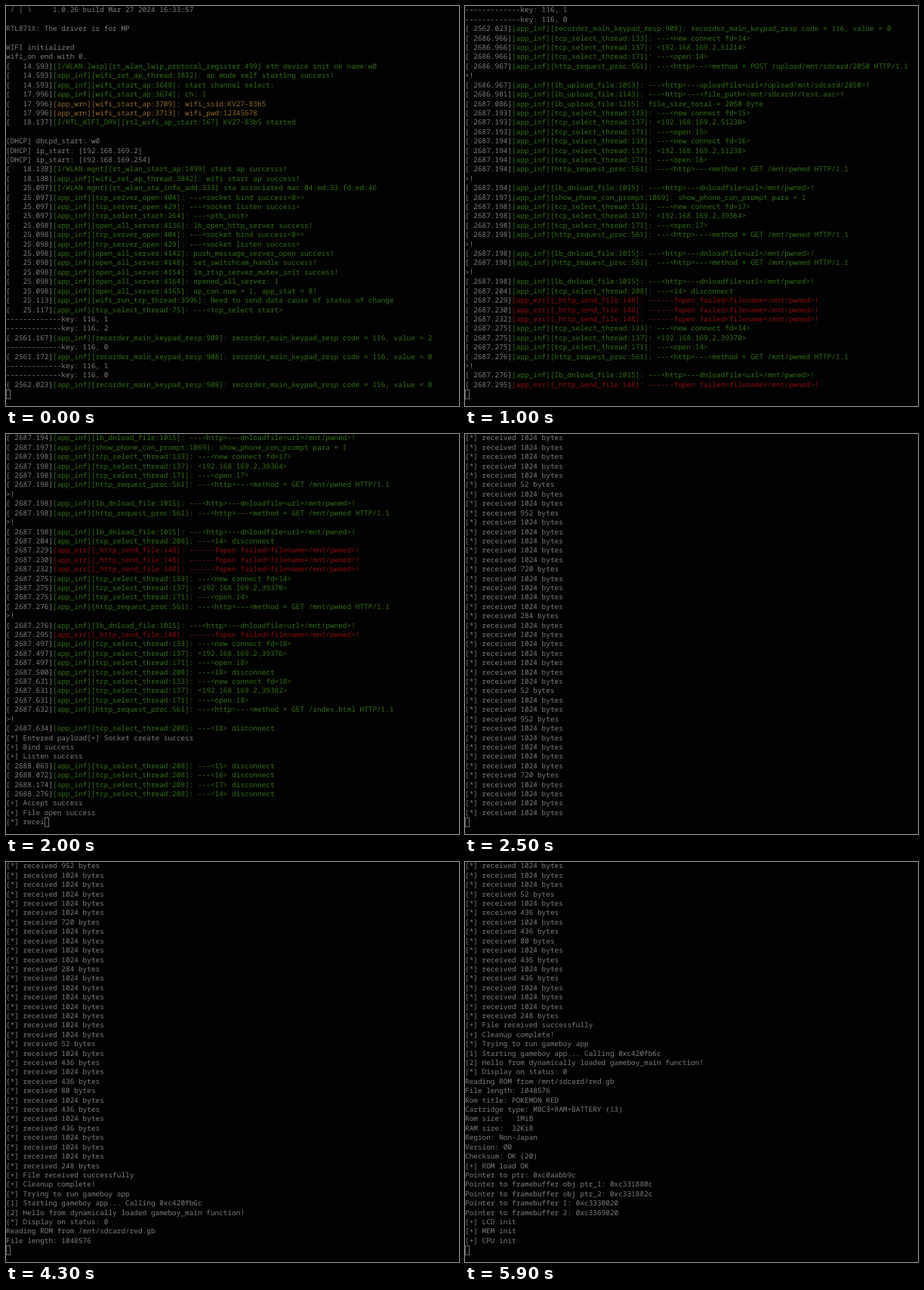
Animation, 600 px wide and 530 px high, one loop 6 s. Source, as an HTML page:

```html
<!DOCTYPE html>
<html lang="en">
<head>
<meta charset="utf-8">
<title>Serial console</title>
<style>
  html, body { margin: 0; width: 100%; height: 100%; overflow: hidden; background: #020202; }
  #term {
    position: relative; width: 600px; height: 530px; overflow: hidden;
    color: #7e7e78;
    font: 9.42px/12.4px "Noto Sans Mono", monospace;
    font-variant-ligatures: none;
    text-rendering: geometricPrecision;
  }
  .row { position: absolute; left: 0; height: 12.4px; white-space: pre; }
  .info { color: #327017; }
  .warn { color: #92692a; }
  .fail { color: #8e0d0d; }
  .cursor {
    display: inline-block; box-sizing: border-box; vertical-align: top;
    width: 6px; height: 12.4px; border: 1px solid #6c6c68;
  }
</style>
</head>
<body>
<div id="term"></div>
<script>
const LOOP = 6000, STEP = 100;
const ROWS = 42, PITCH = 12.41, TOP = -0.6;
const BAUD = 11.5;        // characters per ms
const CLOCK = 2686.36;    // device uptime in seconds when the loop starts

// "uptime tag function:line message", "@ms" sets the time of plain lines
const session = String.raw` / | \     1.0.26 build Mar 27 2024 16:33:57

RTL871X: The driver is for MP

WIFI initialized
wifi_on end with 0.
14.593 I/WLAN.lwip rt_wlan_lwip_protocol_register:499 eth device init ok name:w0
14.593 inf wifi_set_ap_thread:3832 ap mode self starting success!
14.593 inf wifi_start_ap:3648 start channel select:
17.996 inf wifi_start_ap:3674 ch: 1
17.996 wrn wifi_start_ap:3709 wifi_ssid:KV27-83b5
17.996 wrn wifi_start_ap:3713 wifi_pwd:12345678
18.137 I/RTL_WIFI_DRV rtl_wifi_ap_start:167 KV27-83b5 started

[DHCP] dhcpd_start: w0
[DHCP] ip_start: [192.168.169.2]
[DHCP] ip_start: [192.168.169.254]
18.138 I/WLAN.mgnt rt_wlan_start_ap:1499 start ap successs!
18.138 inf wifi_set_ap_thread:3842 wifi start ap success!
25.097 I/WLAN.mgnt rt_wlan_sta_info_add:333 sta associated mac:04:ed:33:fd:ed:46
25.097 inf tcp_server_open:404 ---<socket bind success<0>>
25.097 inf tcp_server_open:429 ---<socket listen success>
25.097 inf tcp_select_start:264 ---<pth_init>
25.098 inf open_all_server:4136 lb_open_http_server success!
25.098 inf tcp_server_open:404 ---<socket bind success<0>>
25.098 inf tcp_server_open:429 ---<socket listen success>
25.098 inf open_all_server:4142 push_message_server_open success!
25.098 inf open_all_server:4148 set_switchcam_handle success!
25.098 inf open_all_server:4154 lm_rtsp_server_mutex_init success!
25.098 inf open_all_server:4164 opened_all_server: 1
25.098 inf open_all_server:4165 ap_con.num = 1, app_stat = 8!
25.113 inf wifi_run_tcp_thread:3996 Need to send data cause of status of change
25.117 inf tcp_select_thread:75 ---<tcp_select start>
-------------key: 116, 1
-------------key: 116, 2
2561.167 inf recorder_main_keypad_resp:908 recorder_main_keypad_resp code = 116, value = 2
-------------key: 116, 0
2561.172 inf recorder_main_keypad_resp:908 recorder_main_keypad_resp code = 116, value = 0
-------------key: 116, 1
-------------key: 116, 0
2562.023 inf recorder_main_keypad_resp:908 recorder_main_keypad_resp code = 116, value = 0
2686.966 inf tcp_select_thread:133 ---<new connect fd=14>
2686.966 inf tcp_select_thread:137 <192.168.169.2,51214>
2686.966 inf tcp_select_thread:171 ---<open:14>
2686.967 inf http_request_proc:561 ---<http>---<method = POST /upload/mnt/sdcard/2050 HTTP/1.1
>!
2686.967 inf lb_upload_file:1053 ---<http>---uploadfile<url=/upload/mnt/sdcard/2050>!
2686.981 inf lb_upload_file:1143 ---<http>---<file_path=/mnt/sdcard//test.aac>!
2687.086 inf lb_upload_file:1215 file_size_total = 2050 Byte
2687.193 inf tcp_select_thread:133 ---<new connect fd=15>
2687.193 inf tcp_select_thread:137 <192.168.169.2,51230>
2687.193 inf tcp_select_thread:171 ---<open:15>
2687.194 inf tcp_select_thread:133 ---<new connect fd=16>
2687.194 inf tcp_select_thread:137 <192.168.169.2,51238>
2687.194 inf tcp_select_thread:171 ---<open:16>
2687.194 inf http_request_proc:561 ---<http>---<method = GET /mnt/pwned HTTP/1.1
>!
2687.194 inf lb_dnload_file:1015 ---<http>---dnloadfile<url=/mnt/pwned>!
2687.197 inf show_phone_con_prompt:1069 show_phone_con_prompt para = 1
2687.198 inf tcp_select_thread:133 ---<new connect fd=17>
2687.198 inf tcp_select_thread:137 <192.168.169.2,39364>
2687.198 inf tcp_select_thread:171 ---<open:17>
2687.198 inf http_request_proc:561 ---<http>---<method = GET /mnt/pwned HTTP/1.1
>!
2687.198 inf lb_dnload_file:1015 ---<http>---dnloadfile<url=/mnt/pwned>!
2687.198 inf http_request_proc:561 ---<http>---<method = GET /mnt/pwned HTTP/1.1
>!
2687.198 inf lb_dnload_file:1015 ---<http>---dnloadfile<url=/mnt/pwned>!
2687.204 inf tcp_select_thread:208 ---<14> disconnect
2687.229 err _http_send_file:148 ------fopen failed<filename=/mnt/pwned>!
2687.230 err _http_send_file:148 ------fopen failed<filename=/mnt/pwned>!
2687.232 err _http_send_file:148 ------fopen failed<filename=/mnt/pwned>!
2687.275 inf tcp_select_thread:133 ---<new connect fd=14>
2687.275 inf tcp_select_thread:137 <192.168.169.2,39370>
2687.275 inf tcp_select_thread:171 ---<open:14>
2687.276 inf http_request_proc:561 ---<http>---<method = GET /mnt/pwned HTTP/1.1
>!
2687.276 inf lb_dnload_file:1015 ---<http>---dnloadfile<url=/mnt/pwned>!
2687.295 err _http_send_file:148 ------fopen failed<filename=/mnt/pwned>!
2687.497 inf tcp_select_thread:133 ---<new connect fd=18>
2687.497 inf tcp_select_thread:137 <192.168.169.2,39376>
2687.497 inf tcp_select_thread:171 ---<open:18>
2687.500 inf tcp_select_thread:208 ---<18> disconnect
2687.631 inf tcp_select_thread:133 ---<new connect fd=18>
2687.631 inf tcp_select_thread:137 <192.168.169.2,39382>
2687.631 inf tcp_select_thread:171 ---<open:18>
2687.632 inf http_request_proc:561 ---<http>---<method = GET /index.html HTTP/1.1
>!
2687.634 inf tcp_select_thread:208 ---<18> disconnect
@1290
[*] Entered payload[+] Socket create success
[+] Bind success
[+] Listen success
2688.063 inf tcp_select_thread:208 ---<15> disconnect
2688.072 inf tcp_select_thread:208 ---<16> disconnect
2688.174 inf tcp_select_thread:208 ---<17> disconnect
2688.276 inf tcp_select_thread:208 ---<14> disconnect
@1930
[+] Accept success
[+] File open success`;

const launch = `@3570
[+] File received successfully
[+] Cleanup complete!
[*] Trying to run gameboy app
@3670
[1] Starting gameboy app... Calling 0xc420fb6c
[2] Hello from dynamically loaded gameboy_main function!
@3970
[*] Display on status: 0
@4270
Reading ROM from /mnt/sdcard/red.gb
File length: 1048576
@5270
Rom title: POKEMON RED
Cartridge type: MBC3+RAM+BATTERY (13)
Rom size:   1MiB
RAM size:  32KiB
Region: Non-Japan
Version: 00
Checksum: OK (20)
[+] ROM load OK
Pointer to ptr: 0xc0aabb9c
Pointer to framebuffer obj ptr_1: 0xc331880c
Pointer to framebuffer obj ptr_2: 0xc331882c
Pointer to framebuffer 1: 0xc3330020
Pointer to framebuffer 2: 0xc3369020
@5670
[+] LCD init
@5770
[+] MEM init
[+] CPU init`;

const tones = { wrn: 'warn', err: 'fail' };
const rows = [];

function addLog(text) {
  let t = -1000;
  for (const line of text.split('\n')) {
    const mark = line.match(/^@(\d+)$/);
    const entry = line.match(/^(\d+\.\d+) (\S+) (\S+) (.*)$/);
    if (mark) {
      t = +mark[1];
    } else if (entry) {
      const [, time, tag, place, message] = entry;
      const source = tag.startsWith('I/') ? `[${tag}][${place}]` : `[app_${tag}][${place}]:`;
      t = (time - CLOCK) * 1000;
      rows.push({ t, head: `[${time.padStart(9)}]`, body: `${source} ${message}`, tone: tones[tag] || 'info' });
    } else {
      rows.push({ t, head: line, body: '', tone: '' });
    }
  }
}

// Pairs: how many full 1024-byte reads, then one short read
function addTransfer() {
  const start = 1999.2, gap = 9.4, stallAt = 133, stall = 100;
  const runs = ('5 720 4 284 7 52 2 952 '.repeat(4) +
    '5 720 7 52 2 952 5 720 4 284 7 52 1 436 1 436 0 80 1 436 1 436 3 248').split(' ');
  let i = 0;
  const receive = size => {
    const t = start + i * gap + (i >= stallAt ? stall : 0);
    rows.push({ t, head: `[*] received ${size} bytes`, body: '', tone: '' });
    i++;
  };
  for (let r = 0; r < runs.length; r += 2) {
    for (let n = +runs[r]; n > 0; n--) receive(1024);
    receive(runs[r + 1]);
  }
}

addLog(session);
addTransfer();
addLog(launch);

const term = document.getElementById('term');

function span(text, className) {
  const el = document.createElement('span');
  el.textContent = text;
  el.className = className;
  return el;
}

const view = Array.from({ length: ROWS }, (_, i) => {
  const el = document.createElement('div');
  el.className = 'row';
  el.style.top = `${TOP + i * PITCH}px`;
  term.append(el);
  return el;
});

function draw(now) {
  const shown = rows.filter(row => row.t <= now);
  const last = shown[shown.length - 1];
  const typed = Math.floor((now - last.t) * BAUD);
  if (typed < last.head.length + last.body.length) {
    shown[shown.length - 1] = {
      head: last.head.slice(0, typed),
      body: last.body.slice(0, Math.max(0, typed - last.head.length)),
      tone: last.tone
    };
  } else {
    shown.push({ head: '', body: '', tone: '' });
  }
  shown.slice(-ROWS).forEach((row, i) => {
    view[i].replaceChildren(span(row.head, ''), span(row.body, row.tone));
  });
  view[ROWS - 1].append(span('', 'cursor'));
}

const begin = performance.now();
let current = -1;

function tick() {
  const time = (performance.now() - begin) % LOOP;
  const now = Math.floor(time / STEP) * STEP;
  if (now !== current) draw(current = now);
  requestAnimationFrame(tick);
}
tick();
</script>
</body>
</html>
```
